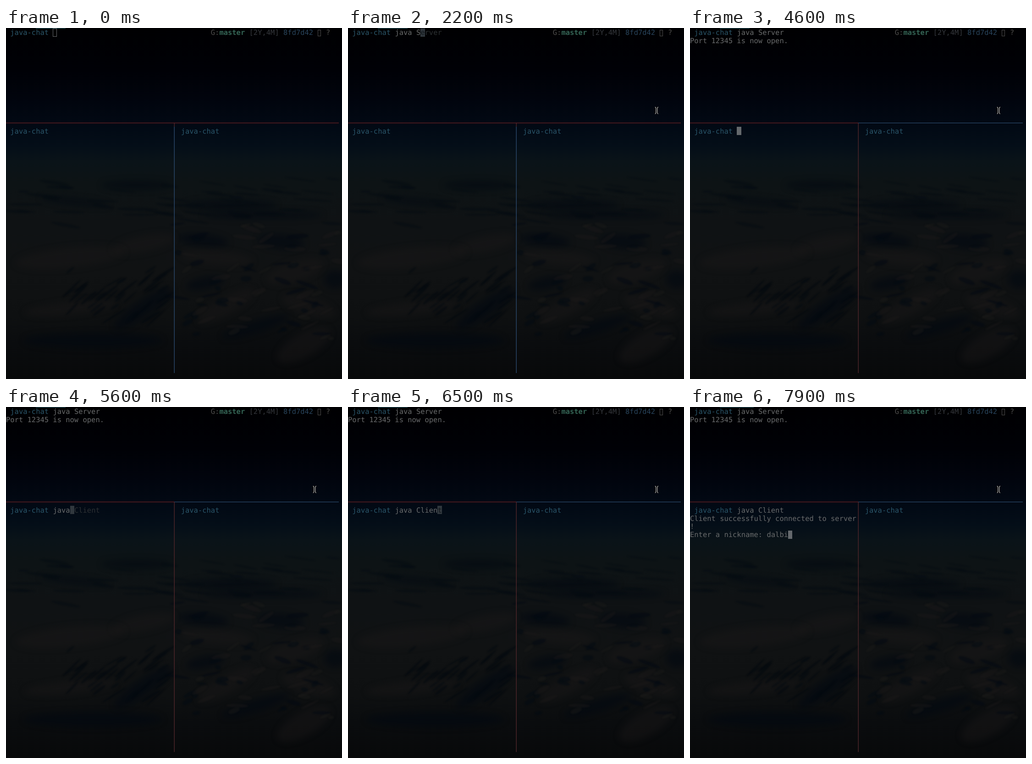
Recreate the animation shown at these times as an HTML page with a canvas. Size 733 by 764 pixels, loop 8 s.

```html
<!DOCTYPE html>
<html lang="en">
<head>
<meta charset="utf-8">
<title>Terminal chat</title>
<style>
  html, body { margin: 0; height: 100%; overflow: hidden; background: #000; }
  canvas { display: block; }
</style>
</head>
<body>
<canvas id="stage" width="733" height="764"></canvas>
<script>
const W = 733, H = 764, LOOP = 8000;
const CW = 9.308, RH = 17.87, RIGHT = 372.4;
const FONT = '15.46px "DejaVu Sans Mono", monospace';
const C = {
  prompt: '#2a5569', text: '#686a6b', dim: '#2c3033', cursor: '#64686c', dimCursor: '#30373d',
  grey: '#4d4c4b', branch: '#346455', age: '#34373c', hash: '#28435b',
  red: '#672024', darkRed: '#4b2529', blue: '#294566', tab: '#1d454e'
};
const ctx = document.getElementById('stage').getContext('2d');
const backdrop = paintBackdrop();

// Key press times for each typed line
const serverKeys = [1500, 1500, 1600, 1800, 2000, 2200];
const clientKeys = [5300, 5400, 5500, 5600, 5800, 5900, 6100, 6300, 6400, 6500, 6600];
const nameKeys = [7300, 7400, 7500, 7700, 7900];
const pressed = (keys, t) => keys.filter(k => k <= t).length;

function paintBackdrop() {
  const layer = document.createElement('canvas');
  layer.width = W;
  layer.height = H;
  const g = layer.getContext('2d');
  const sky = g.createLinearGradient(0, 0, 0, H);
  [[0, '#000002'], [.12, '#000106'], [.2, '#01040d'], [.29, '#020a15'], [.335, '#040e18'],
   [.38, '#0a1318'], [.44, '#0d1315'], [.56, '#0f1214'], [.7, '#101213'], [.82, '#0e1011'],
   [.9, '#0a0c0e'], [1, '#08090a']].forEach(s => sky.addColorStop(...s));
  g.fillStyle = sky;
  g.fillRect(0, 0, W, H);

  let seed = 11;
  const rnd = () => (seed = seed * 16807 % 2147483647) / 2147483647;
  const blob = (x, y, rx, ry, turn, color) => {
    g.fillStyle = color;
    g.beginPath();
    g.ellipse(x, y, rx, ry, turn, 0, 7);
    g.fill();
  };
  const shade = 'rgba(2,9,18,.6)', snow = 'rgba(28,27,26,.4)';

  g.filter = 'blur(7px)';
  [[285, 342, 75, 9, 0], [150, 378, 75, 6, .1], [490, 385, 100, 10, 0], [600, 465, 50, 16, .1],
   [430, 462, 55, 14, .1], [435, 555, 42, 13, -.2], [718, 547, 24, 20, 0], [300, 610, 75, 18, -.6],
   [545, 650, 75, 13, -.3], [190, 680, 150, 16, 0], [560, 407, 130, 8, 0]]
    .forEach(b => blob(...b, shade));
  [[300, 470, 70, 18, -.2], [140, 500, 120, 22, -.1], [630, 530, 65, 22, -.3], [480, 605, 70, 20, -.5],
   [650, 690, 65, 26, -.5], [660, 605, 60, 20, .3], [140, 610, 100, 14, -.1], [460, 500, 80, 16, .1]]
    .forEach(b => blob(...b, snow));

  // Gullies and ridges
  g.filter = 'blur(1.5px)';
  for (let i = 0; i < 40; i++)
    blob(140 + rnd() * 220, 525 + rnd() * 110, 10 + rnd() * 20, 1.5 + rnd() * 2, -.8 + rnd() * .3, 'rgba(2,8,15,.45)');
  for (let i = 0; i < 75; i++) {
    const y = 425 + rnd() * 255, x = 370 + rnd() * 363;
    blob(x, y, 6 + rnd() * 20, 2 + rnd() * 4, -.7 + rnd() * 1.1, i % 2 ? snow : 'rgba(2,9,18,.5)');
  }
  for (let i = 0; i < 45; i++)
    blob(rnd() * W, 325 + rnd() * 105, 10 + rnd() * 35, 1 + rnd() * 3, rnd() * .2, 'rgba(3,11,19,.4)');
  g.filter = 'none';
  return layer;
}

function write(str, x, row, color, bold) {
  ctx.font = (bold ? 'bold ' : '') + FONT;
  ctx.fillStyle = color;
  ctx.fillText(str, x, 15.3 + row * RH);
}

function rect(x, y, w, h, color) {
  ctx.fillStyle = color;
  ctx.fillRect(x, y, w, h);
}

function cursor(x, row, color = C.cursor) {
  const left = Math.round(x), top = Math.round(1 + row * RH);
  rect(left, top, Math.round(x + CW) - left, 18, color);
}

// Typed part in bright text, the shell's suggestion in dim text behind the cursor
function command(line, n, row) {
  const x = 11 * CW, at = x + n * CW;
  if (!n || n === line.length) {
    if (n) write(line, x, row, C.text);
    return cursor(at, row);
  }
  write(line.slice(0, n), x, row, C.text);
  write(line.slice(n + 1), at + CW, row, C.dim);
  cursor(at, row, C.dimCursor);
  write(line[n], at, row, '#11161a');
}

function box(x, y, w, h, color) {
  ctx.strokeStyle = color;
  ctx.lineWidth = 1;
  ctx.strokeRect(x, y, w, h);
}

function pointer(x, y) {
  for (const [width, color] of [[3, '#000'], [1.1, '#d0d0d0']]) {
    ctx.lineWidth = width;
    ctx.strokeStyle = color;
    for (const s of [-1, 1]) {
      ctx.beginPath();
      ctx.moveTo(x + s * 3.5, y - 7.5);
      ctx.quadraticCurveTo(x + s * 1.5, y - 7, x + s * 1.5, y - 4);
      ctx.lineTo(x + s * 1.5, y + 4);
      ctx.quadraticCurveTo(x + s * 1.5, y + 7, x + s * 3.5, y + 7.5);
      ctx.stroke();
    }
  }
}

function borders(active) {
  const top = active === 'top';
  rect(0, 206, 367, 1.3, active === 'right' ? C.blue : C.red);
  rect(367, 206, 359, 1.3, active === 'left' ? C.blue : C.red);
  rect(366.5, 207, 1.5, 8, C.darkRed);
  rect(366.5, 215, 1.5, 536, top ? C.blue : C.darkRed);
}

function topPane(t) {
  rect(65, 0, t < 7300 ? 65 : 74, 1.3, C.tab);
  write('java-chat', CW, 0, C.prompt);
  write('G:', 48 * CW, 0, C.grey);
  write('master', 50 * CW, 0, C.branch, true);
  write('[2Y,4M]', 57 * CW, 0, C.age);
  write('8fd7d42', 65 * CW, 0, C.hash);
  box(680.5, 4.5, 6, 13, C.grey);
  write('?', 75 * CW, 0, C.grey);
  if (t < 400) box(102.5, 1.5, 8, 17, C.text);
  else if (t < 3700) command('java ' + (t < 2200 ? 'Client' : 'Server'), pressed(serverKeys, t), 0);
  else {
    write('java Server', 11 * CW, 0, C.text);
    write('Port 12345 is now open.', 0, 1, C.text);
    if (t < 4000) cursor(0, 2);
  }
}

function leftPane(t) {
  write('java-chat', CW, 12, C.prompt);
  if (t < 4600) return;
  if (t < 6800) return command('java Client', pressed(clientKeys, t), 12);
  write('java Client', 11 * CW, 12, C.text);
  if (t < 6900) return cursor(0, 13);
  const entry = 'Enter a nickname: ' + 'dalbi'.slice(0, pressed(nameKeys, t));
  write('Client successfully connected to server', 0, 13, C.text);
  write('!', 0, 14, C.text);
  write(entry, 0, 15, C.text);
  cursor(entry.length * CW, 15);
}

function draw(now) {
  const t = now % LOOP;
  const active = t < 4000 ? 'top' : t < 4600 ? 'right' : 'left';
  ctx.textRendering = 'geometricPrecision';
  ctx.drawImage(backdrop, 0, 0);
  borders(active);
  topPane(t);
  leftPane(t);
  write('java-chat', RIGHT + CW, 12, C.prompt);
  if (active === 'right') cursor(RIGHT + 11 * CW, 12);
  if (t >= 400) pointer(t < 500 ? 685 : 673.3, 179.5);
  requestAnimationFrame(draw);
}
requestAnimationFrame(draw);
</script>
</body>
</html>
```
